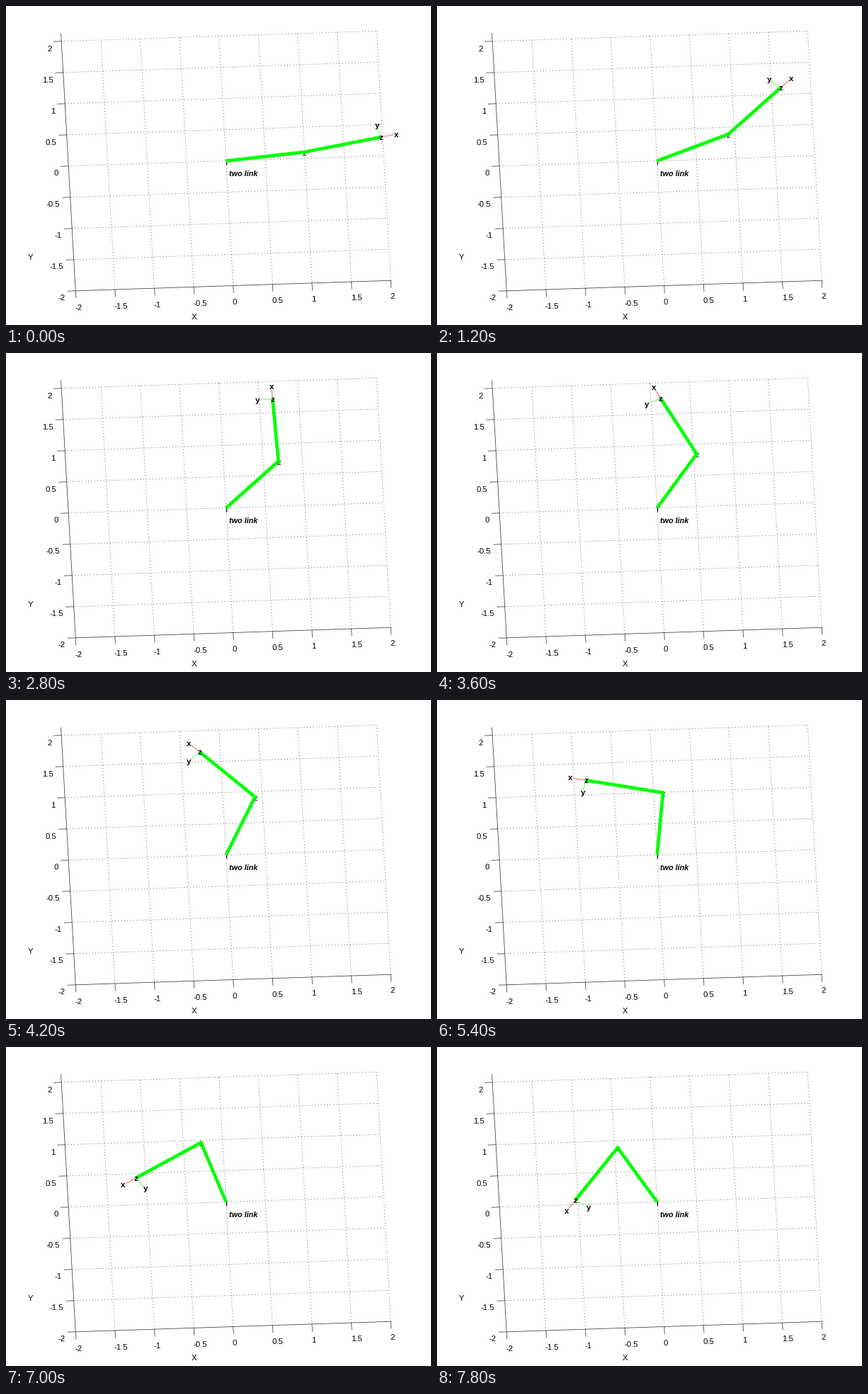
Animation, 600 px wide and 450 px high, one loop 8000 ms. Source, as a matplotlib script:

```python
import numpy as np
import matplotlib.pyplot as plt
from matplotlib.animation import FuncAnimation

W, H, DPI = 600, 450, 100
FRAMES, INTERVAL = 40, 200
PX = 72 / DPI

plt.rcParams["font.family"] = "Liberation Sans"
fig = plt.figure(figsize=(W / DPI, H / DPI), dpi=DPI, facecolor="white")
ax = fig.add_axes([0, 0, 1, 1])
ax.set_xlim(-0.5, W - 0.5)
ax.set_ylim(H - 0.5, -0.5)
ax.axis("off")

# Tilted view of the plane: screen position of the base and of the unit axes
BASE = np.array([310.2, 218.0])
UX = np.array([111.25, -3.65])
UY = np.array([-5.0, -88.0])


def project(x, y):
    return BASE + x * UX + y * UY


def direction(angle):
    return np.cos(angle) * UX + np.sin(angle) * UY


def stroke(points, color="#404040", width=0.8, **kw):
    xs, ys = np.array(points).T
    return ax.plot(xs, ys, color=color, lw=width * PX, **kw)[0]


def label(x, y, text, size=11.4, **kw):
    return ax.text(x, y, text, fontsize=size * PX, color="black",
                   va="baseline", **kw)


def draw_axes():
    dots = dict(color="#484848", width=0.85, dashes=(1.1, 4), dash_capstyle="butt")
    for i, v in enumerate(np.arange(-2, 2.1, 0.5)):
        if i:
            stroke([project(v, -2), project(v, 2)], **dots)
            stroke([project(-2, v), project(2, v)], **dots)
        foot, side = project(v, -2), project(-2, v)
        stroke([foot, foot + (0.6, 10)])
        stroke([side, side + (-10.8, 0.4)])
        label(96.6 + 55.7 * i, 428.2 - 1.95 * i, f"{v:g}")
        label(83.2 - 2.42 * i, 414.5 - 43.9 * i, f"{v:g}", ha="right")
    top = project(-2, 2)
    stroke([project(2, -2), project(-2, -2), top, top + (-0.7, -11)])
    label(264.6, 442, "X", ha="center")
    label(34, 358, "Y", ha="center")


draw_axes()
label(314.2, 239.2, "two link", 10.7, weight="bold", style="italic", zorder=6)

stroke([BASE + (0, -3), BASE + (0, 4)], "black", 1.2, zorder=3)
joint = label(0, 0, "z", 11.5, ha="center", zorder=3)
arm = stroke([BASE, BASE], "#00ff00", 4.7, zorder=4,
             solid_capstyle="butt", solid_joinstyle="miter")
tool = {}
for name, color in (("x", "#ff5050"), ("y", "#50ff50")):
    tool[name] = (stroke([BASE, BASE], color, 0.9, zorder=3),
                  label(0, 0, name, 11.4, weight="bold", ha="center", zorder=6))
tip_mark = label(0, 0, "z", 11.4, weight="bold", ha="center", zorder=6)


def update(i):
    q = 0.1 + 0.05 * i
    elbow = BASE + direction(q)
    tip = elbow + direction(2 * q)
    arm.set_data(*np.array([BASE, elbow, tip]).T)
    joint.set_position(elbow + (0.5, 5))
    tip_mark.set_position(tip + (0, 3.9))
    for name, turn in (("x", 0), ("y", np.pi / 2)):
        line, text = tool[name]
        d = direction(2 * q + turn)
        line.set_data(*np.array([tip, tip + 0.16 * d]).T)
        text.set_position(tip + 0.2 * d + (0.4, 3.8))
    return [arm, joint, tip_mark]


anim = FuncAnimation(fig, update, frames=FRAMES, interval=INTERVAL,
                     init_func=lambda: update(0), repeat=True, repeat_delay=0)
plt.show()
```
